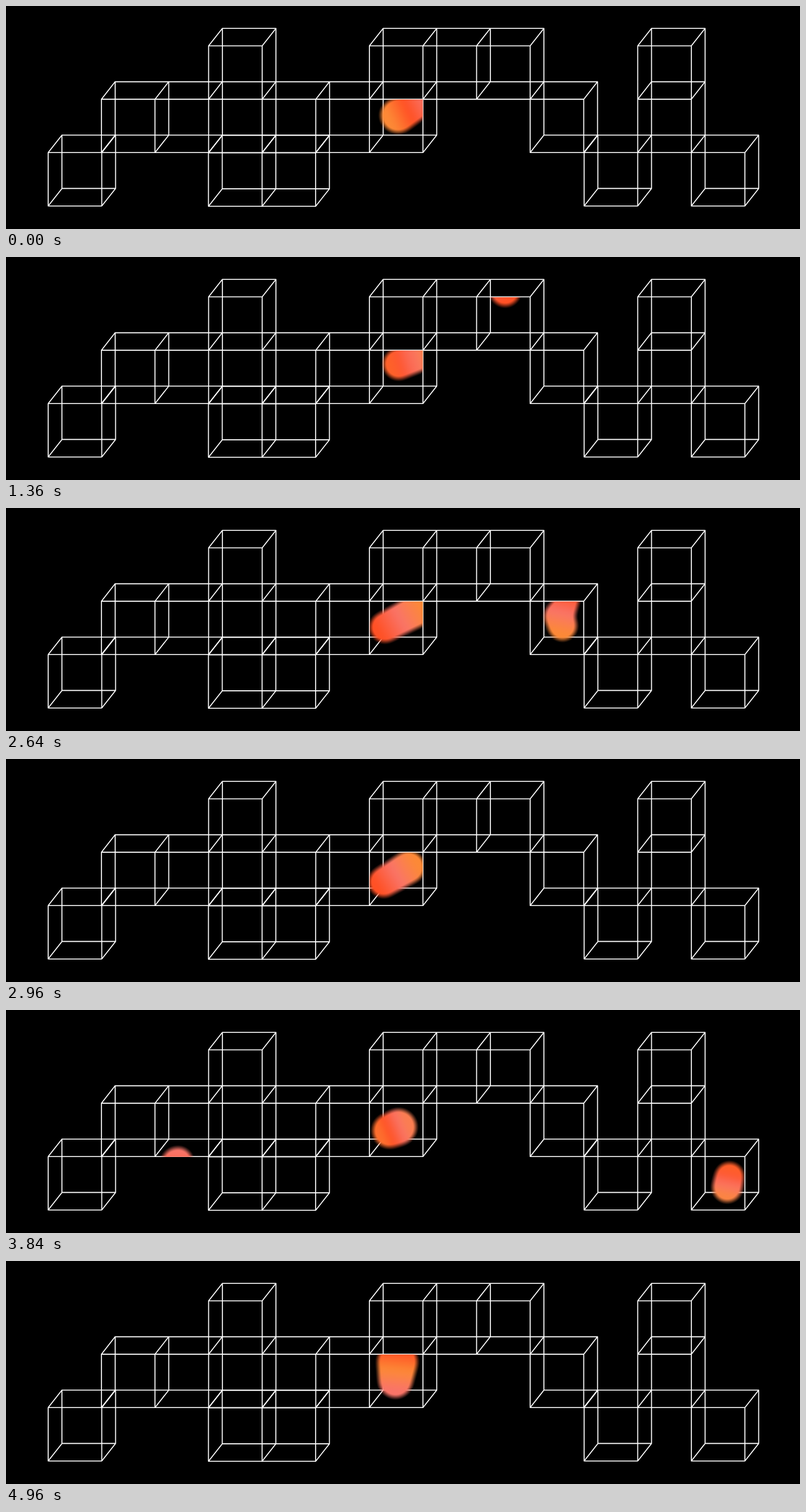
Animation of 1280 by 361 pixels, one loop 5040 ms. Source, as an HTML page:

```html
<!DOCTYPE html>
<html lang="en">
<head>
<meta charset="utf-8">
<title>Cubes</title>
<style>
html, body { margin: 0; width: 100%; height: 100%; overflow: hidden; background: #000; }
svg { display: block; width: 1280px; height: 361px; }
</style>
</head>
<body>
<svg id="stage" viewBox="0 0 1280 361" xmlns="http://www.w3.org/2000/svg">
  <rect width="1280" height="361" fill="#000"/>
</svg>
<script>
const LOOP = 5040, STEP = 80;
const SIZE = 86.4, LEFT = 68, TOP = 64.5, DX = 22.2, DY = -28.3;
const CYCLE = [[255, 80, 36], [249, 116, 104], [252, 137, 54]]; // red, pink, orange
const DOTS = 6; // circles per segment of a blob

const svg = document.getElementById('stage');
const mix = (a, b, u) => a + (b - a) * u;
const mixAll = (a, b, u) => a.map((v, i) => mix(v, b[i], u));

function el(name, attrs, parent) {
  const node = document.createElementNS('http://www.w3.org/2000/svg', name);
  set(node, attrs);
  return parent.appendChild(node);
}
function set(node, attrs) {
  for (const k in attrs) node.setAttribute(k, attrs[k]);
}

// Wireframe: groups of cubes [column, row] with a small shift each
function cubes(shiftX, shiftY, cells) {
  let d = '';
  for (const [c, r] of cells) {
    const x = LEFT + c * SIZE + shiftX, y = TOP + r * SIZE + shiftY;
    const square = (a, b) => `M${a} ${b}h${SIZE}v${SIZE}h${-SIZE}z`;
    d += square(x, y) + square(x + DX, y + DY);
    for (const i of [0, SIZE]) for (const j of [0, SIZE]) d += `M${x + i} ${y + j}l${DX} ${DY}`;
  }
  el('path', { d, fill: 'none', stroke: '#fff', 'stroke-width': 1.6, 'stroke-linejoin': 'round' }, svg);
}
const row = (r, ...cols) => cols.map(c => [c, r]);
cubes(0, 0, [...row(0, 11), ...row(1, 11), ...row(2, 0, 10, 12)]);
cubes(-.6, 0, [...row(0, 3, 6, 7, 8), ...row(1, 1, 2, 3, 4, 5, 6, 9)]);
cubes(-.8, .5, row(2, 3, 4));

// A blob enters, reaches a point and leaves again, its tail lagging behind
function pass(t0, t1, from, via, to) {
  const joint = p => [...p, 24];
  return [
    [t0, 0, joint(from), joint(from)],
    [(t0 + t1) / 2, 0, joint(via), joint(mixAll(from, via, .5))],
    [t1, 0, joint(to), joint(to)]
  ];
}

// Keys: time, colour phase, then joints as [x, y, radius]
const blobs = [
  { cell: [6, 1], keys: [
    [0, 2, [632, 177, 28], [668, 160, 20]],
    [320, 2.1, [628, 181, 28], [668, 160, 20]],
    [800, 2.4, [637, 162, 26], [668, 162, 18]],
    [1920, 3, [629, 184, 23], [668, 163, 25]],
    [2640, 3, [611, 193, 24], [660, 167, 26]],
    [3280, 3, [607, 205, 24], [638, 183, 26]],
    [4320, 2, [628, 187, 30], [628, 195, 31]],
    [4960, 1, [628, 194, 27], [631, 163, 32]]] },
  { cell: [9, 1], keys: [
    [1960, 0, [958, 180, 20], [958, 186, 20], [958, 192, 22]],
    [2240, 0, [920, 160, 18], [918, 176, 22], [918, 190, 23]],
    [2640, 0, [907, 147, 17], [892, 175, 24], [897, 191, 23]],
    [2960, 0, [892, 110, 17], [890, 118, 22], [892, 124, 23]]] },
  { cell: [12, 2], keys: [
    [3000, .3, [1222, 330, 24], [1222, 338, 24]],
    [3280, .3, [1188, 237, 28], [1188, 269, 28]],
    [3680, 0, [1168, 262, 24], [1166, 284, 25]],
    [4320, -1, [1161, 294, 20], [1153, 296, 20]],
    [4480, -1, [1161, 352, 20], [1153, 352, 20]]] },
  { cell: [2, 1], keys: [
    [3720, 2, [276, 268, 20], [272, 264, 22], [268, 264, 22]],
    [4320, 2, [284, 236, 17], [283, 177, 28], [318, 170, 25]],
    [4480, 2, [350, 124, 18], [352, 120, 22], [356, 120, 22]]] },
  { cell: [2, 1], keys: pass(840, 1240, [244, 268], [306, 178], [360, 168]) },
  { cell: [8, 0], keys: pass(1240, 1860, [800, 36], [812, 86], [800, 36]) },
  { cell: [4, 2], keys: pass(2000, 2480, [515, 208], [482, 236], [518, 208]) },
  { cell: [8, 0], keys: pass(4560, 4920, [872, 122], [826, 104], [872, 122]) }
];

const defs = el('defs', {}, svg);
blobs.forEach((b, i) => {
  const x = LEFT + b.cell[0] * SIZE - .6, y = TOP + b.cell[1] * SIZE + .4;
  const box = (m) => ({ x: x - m, y: y - m, width: SIZE + 2 * m, height: SIZE + 2 * m });
  el('rect', box(0), el('clipPath', { id: 'clip' + i }, defs));

  const goo = el('filter', { id: 'goo' + i, filterUnits: 'userSpaceOnUse',
    'color-interpolation-filters': 'sRGB', ...box(60) }, defs);
  el('feGaussianBlur', { stdDeviation: 5 }, goo);
  el('feColorMatrix', { values: '1 0 0 0 0 0 1 0 0 0 0 0 1 0 0 0 0 0 1.5 -0.25' }, goo);

  b.grad = el('linearGradient', { id: 'grad' + i, gradientUnits: 'userSpaceOnUse' }, defs);
  b.stops = [0, .25, .5, .75, 1].map(offset => el('stop', { offset }, b.grad));

  b.group = el('g', { 'clip-path': `url(#clip${i})` }, svg);
  const inner = el('g', { filter: `url(#goo${i})`, fill: `url(#grad${i})` }, b.group);
  const segments = b.keys[0].length - 3;
  b.dots = Array.from({ length: segments * DOTS + 1 }, () => el('circle', {}, inner));
});

function color(phase) {
  const p = (phase % 3 + 3) % 3, n = Math.floor(p);
  return `rgb(${mixAll(CYCLE[n], CYCLE[(n + 1) % 3], p - n).map(Math.round)})`;
}

function drawBlob(b, t) {
  const k = b.keys;
  const on = t >= k[0][0] && t <= k[k.length - 1][0];
  set(b.group, { display: on ? 'inline' : 'none' });
  if (!on) return;

  let n = 0;
  while (n < k.length - 2 && t >= k[n + 1][0]) n++;
  const [t0, phase0, ...from] = k[n], [t1, phase1, ...to] = k[n + 1];
  const u = (t - t0) / (t1 - t0), phase = mix(phase0, phase1, u);
  const joints = from.map((j, i) => mixAll(j, to[i], u));

  b.dots.forEach((dot, i) => {
    const s = Math.min(Math.floor(i / DOTS), joints.length - 2);
    const [cx, cy, r] = mixAll(joints[s], joints[s + 1], i / DOTS - s);
    set(dot, { cx, cy, r });
  });

  // The gradient runs past both ends by half a radius
  const [ax, ay, ar] = joints[0], [bx, by, br] = joints[joints.length - 1];
  const len = Math.hypot(bx - ax, by - ay) || 1;
  const ux = (bx - ax) / len, uy = (by - ay) / len;
  set(b.grad, { x1: ax - ux * ar / 2, y1: ay - uy * ar / 2, x2: bx + ux * br / 2, y2: by + uy * br / 2 });
  b.stops.forEach((stop, i) => set(stop, { 'stop-color': color(phase + i / 2) }));
}

const start = performance.now();
let last = -1;
function tick() {
  const t = Math.floor((performance.now() - start) % LOOP / STEP) * STEP;
  if (t !== last) blobs.forEach(b => drawBlob(b, t));
  last = t;
  requestAnimationFrame(tick);
}
tick();
</script>
</body>
</html>
```
